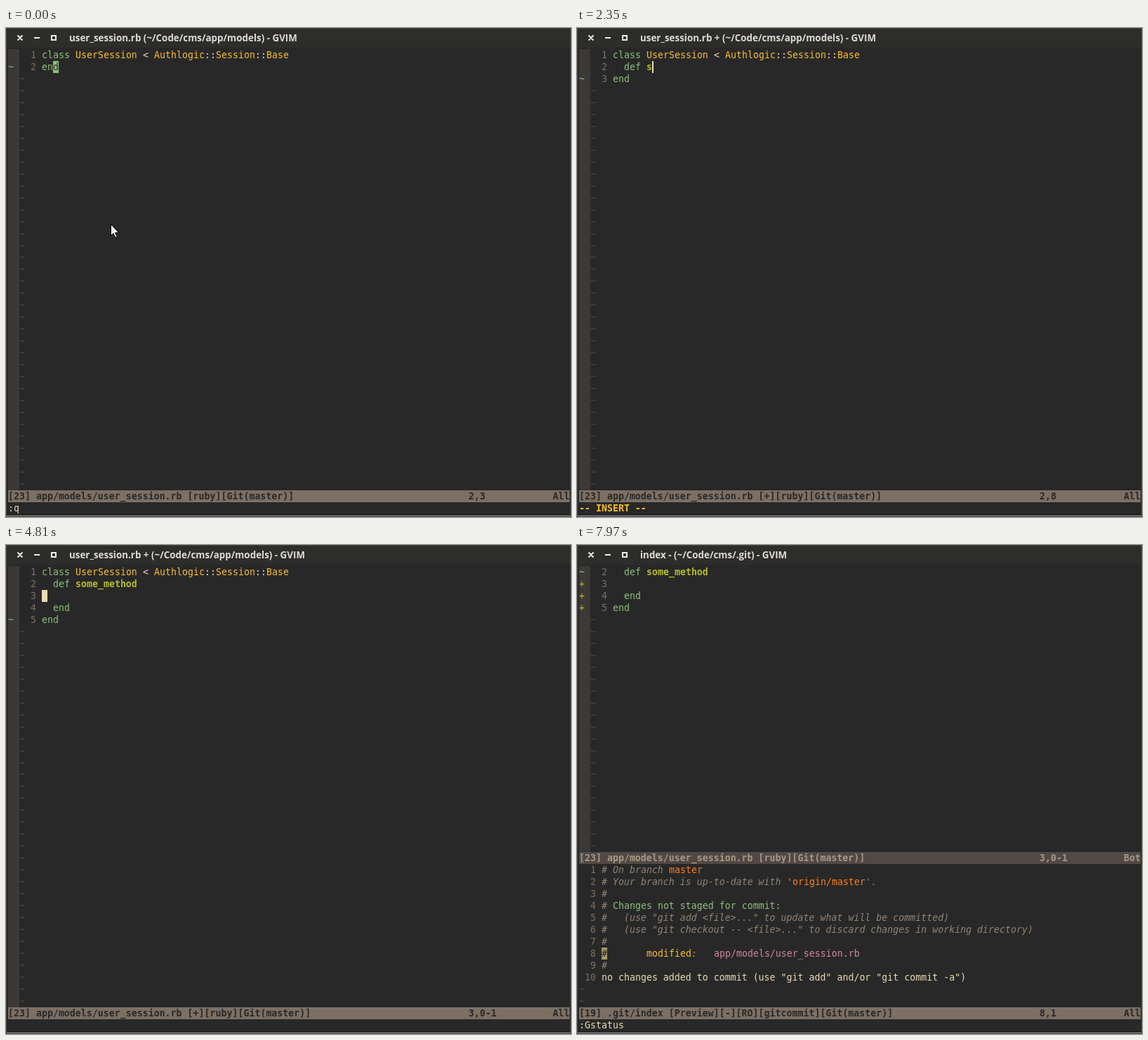
Recreate the animation shown at these times as an HTML page with a canvas. Size 805 px wide and 696 px high, loop 8 s.

```html
<!DOCTYPE html>
<html lang="en">
<head>
<meta charset="utf-8">
<title>Editor session</title>
<style>
html, body { margin: 0; width: 100%; height: 100%; overflow: hidden; background: #282828; }
canvas { display: block; }
</style>
</head>
<body>
<canvas id="stage" width="805" height="696"></canvas>
<script>
const ctx = document.getElementById('stage').getContext('2d');
const LOOP = 8000, W = 8, H = 16.97, LEFT = 3, TOP = 30;
const MONO = '13.288px "DejaVu Sans Mono", monospace';
const C = {
  bg: '#282828', fg: '#ebdbb2', green: '#8ec07c', lime: '#b8bb26', yellow: '#fabd2f',
  orange: '#fe8019', pink: '#d3869b', grey: '#928374', num: '#7c6f64', faint: '#504945',
  sign: '#3c3836', bar: '#7c6f64', menu: '#504945', dimText: '#a89984', hash: '#a39c6c'
};
const BUFFER_WORDS = ('DESC delete digest default destroy details defined defaults directory deleteable? ' +
  'definitions define_method deliver_enquiry deliver_confirmation').split(' ');
const SYNTAX_WORDS = ('def DEBUG defout deferr debugger defined? delegate DESCRIPTION delegating_accessor').split(' ');
const WORDS = [...BUFFER_WORDS.map(w => [w, 'B']), ...SYNTAX_WORDS.map(w => [w, 'S'])];
const DEF_WORDS = WORDS.filter(([w]) => w.startsWith('def'));
const SOME = [['some', 'B']];
const FILE = 'app/models/user_session.rb';

// Insert mode: typed text, ruler position, completion menu
const type = (typed, pos, menu = null) => ({ typed, col: typed.length + 2, pos, menu });
const cmdline = cmd => ({ cmd, row: 38, col: cmd.length, cursor: 'block', ink: C.fg, under: '' });
const gitRow = n => ({ row: 24 + n, pos: n + ',1' });

// Each entry changes part of the state from its time on
const EVENTS = [
  [0, { typed: null, body: false, split: false, index: false, mod: false, signs: ' ~', row: 1, col: 2,
        cursor: 'block', ink: C.green, under: 'd', pos: '2,3', cmd: ':q', keys: '', menu: null, mouse: true }],
  [520, { cursor: '' }],
  [770, { cursor: 'block' }],
  [1080, { row: 0, under: 'a', mouse: false }],
  [1120, { pos: '1,3' }],
  [1600, { ...type('', '2,3'), row: 1, cursor: 'bar', mod: true, cmd: '-- INSERT --', signs: '  ~' }],
  [1920, type('d', '2,4')],
  [1960, type('de', '2,5-4')],
  [2000, type('de', '2,5', WORDS)],
  [2040, type('def', '2,6-5', DEF_WORDS)],
  [2200, type('def ', '2,7')],
  [2350, type('def s', '2,8')],
  [2440, type('def so', '2,9', SOME)],
  [2540, type('def som', '2,10-9', SOME)],
  [2660, type('def some', '2,11-10', SOME)],
  [2990, type('def some_', '2,12')],
  [3150, type('def some_m', '2,13')],
  [3190, type('def some_me', '2,13')],
  [3230, { pos: '2,14' }],
  [3380, type('def some_met', '2,15')],
  [3440, type('def some_meth', '2,16')],
  [3500, type('def some_metho', '2,17')],
  [3570, type('def some_method', '2,17')],
  [3630, { pos: '2,18' }],
  [4130, { body: true, row: 2, col: 4, pos: '3,5', signs: '    ~' }],
  [4810, { col: 0, cursor: 'block', ink: C.fg, under: '', pos: '3,0-1', cmd: '' }],
  [5070, cmdline(':')],
  [5220, cmdline(':w')],
  [5370, { cmd: `"${FILE}" 5L, 74C written`, row: 2, col: 0 }],
  [5410, { mod: false }],
  [5450, { signs: ' ~+++' }],
  [6040, { keys: '<20>' }],
  [6140, { keys: '<20>g' }],
  [6250, { ...cmdline(':Gstatus'), keys: '' }],
  [6390, { split: true, signs: '~+++', ...gitRow(1), col: 0, ink: C.hash, under: '#' }],
  [6430, { index: true }],
  [6920, gitRow(2)],
  [7090, gitRow(3)],
  [7250, gitRow(4)],
  [7430, gitRow(5)],
  [7930, gitRow(7)],
  [7970, gitRow(8)]
];

const x = col => LEFT + col * W;
const y = row => Math.round(TOP + row * H);

function box(col, row, cols, rows, color) {
  ctx.fillStyle = color;
  ctx.fillRect(x(col), y(row), cols * W, y(row + rows) - y(row));
}

function text(col, row, str, color = C.fg, style = '') {
  ctx.font = style + ' ' + MONO;
  ctx.fillStyle = color;
  ctx.fillText(str, x(col), y(row) + 13);
}

// Consecutive pieces: [string, color, style]
function line(col, row, ...parts) {
  for (const [str, color, style] of parts) {
    text(col, row, str, color, style);
    col += str.length;
  }
}

function statusBar(row, name, pos, right, active) {
  box(0, row, 100, 1, active ? C.bar : C.menu);
  const color = active ? C.bg : C.dimText;
  text(0, row, name, color, 'bold');
  text(82, row, pos, color, 'bold');
  text(97, row, right, color, 'bold');
}

function titleBar(title) {
  ctx.fillStyle = '#2d2d2b';
  ctx.fillRect(0, 0, 805, 28);
  ctx.font = 'bold 13.4px "Open Sans", sans-serif';
  ctx.fillStyle = '#dfdbd2';
  ctx.fillText(title, 90, 19);
  ctx.strokeStyle = '#eeeeec';
  ctx.lineWidth = 2;
  ctx.beginPath();
  ctx.moveTo(16.5, 10.5); ctx.lineTo(23.5, 17.5);
  ctx.moveTo(23.5, 10.5); ctx.lineTo(16.5, 17.5);
  ctx.moveTo(40, 14); ctx.lineTo(48, 14);
  ctx.rect(65, 11, 6, 6);
  ctx.stroke();
}

function frame() {
  ctx.fillStyle = '#464543';
  ctx.fillRect(0, 0, 805, 1);
  ctx.fillRect(0, 0, 1, 696);
  ctx.fillRect(804, 0, 1, 696);
  ctx.fillStyle = '#a9a8a4';
  ctx.fillRect(1, 694, 803, 1);
}

function codeLines(s) {
  const end = ['end', C.green];
  const lines = [[['class ', C.green], ['UserSession', C.yellow], [' < '], ['Authlogic', C.yellow], ['::'],
    ['Session', C.yellow], ['::'], ['Base', C.yellow]]];
  if (s.typed !== null) {
    const isDef = s.typed.startsWith('def');
    lines.push([['  '], [s.typed.slice(0, 3), isDef ? C.green : C.fg], [s.typed.slice(3), C.lime, 'bold']]);
  }
  if (s.body) lines.push([], [['  '], end]);
  lines.push([end]);
  return lines;
}

function codeWindow(s) {
  const rows = s.split ? 24 : 37, first = s.split ? 1 : 0;
  const lines = codeLines(s);
  box(0, 0, 2, rows, C.sign);
  for (let r = 0; r < rows; r++) {
    const sign = s.signs[r] || '', parts = lines[r + first];
    text(0, r, sign, sign === '+' ? C.lime : C.green);
    if (parts) {
      text(4, r, String(r + first + 1), C.num);
      line(6, r, ...parts);
    } else text(2, r, '~', C.faint);
  }
  const name = `[23] ${FILE} ${s.mod ? '[+]' : ''}[ruby][Git(master)]`;
  statusBar(rows, name, s.split ? '3,0-1' : s.pos, s.split ? 'Bot' : 'All', !s.split);
}

function gitWindow(s) {
  const note = str => [str, C.grey, 'italic'];
  const lines = [
    [note('# On branch '), ['master', C.orange]],
    [note('# Your branch is up-to-date with '), ["'", C.orange, 'italic'], ['origin/master', C.orange], note("'.")],
    [note('#')],
    [note('# '), ['Changes not staged for commit:', C.green]],
    [note('#   (use "git add <file>..." to update what will be committed)')],
    [note('#   (use "git checkout -- <file>..." to discard changes in working directory)')],
    [note('#')],
    [note('#       '), ['modified', C.yellow], note(':   '), [FILE, C.pink]],
    [note('#')],
    [['no changes added to commit (use "git add" and/or "git commit -a")']]
  ];
  lines.forEach((parts, i) => {
    text(0, 25 + i, String(i + 1).padStart(3), C.num);
    line(4, 25 + i, ...parts);
  });
  text(0, 35, '~', C.faint);
  text(0, 36, '~', C.faint);
  statusBar(37, '[19] .git/index [Preview][-][RO][gitcommit][Git(master)]', s.pos, 'All', true);
}

function menu(items, col) {
  const longest = Math.max(...items.map(([w]) => w.length));
  box(col, 2, Math.max(16, longest + 6), items.length, C.menu);
  items.forEach(([w, kind], i) => text(col + 1, 2 + i, `${w.padEnd(longest + 1)}[${kind}]`));
}

function cursor(s) {
  const col = s.row === 38 ? s.col : s.col + (s.split ? 4 : 6);
  if (s.cursor === 'block') {
    box(col, s.row, 1, 1, s.ink);
    text(col, s.row, s.under, C.bg);
  } else if (s.cursor === 'bar') {
    ctx.fillStyle = C.fg;
    ctx.fillRect(x(col), y(s.row), 2, 17);
  }
}

function pointer() {
  const p = new Path2D('M149.5 279.5V295.5L153 292.2L155.7 298.3L158.3 297.2L155.6 291.2H160.5Z');
  ctx.fillStyle = '#fff';
  ctx.fill(p);
  ctx.strokeStyle = '#000';
  ctx.lineWidth = 1;
  ctx.stroke(p);
}

function draw(t) {
  const s = {};
  for (const [at, change] of EVENTS) if (at <= t) Object.assign(s, change);
  ctx.fillStyle = C.bg;
  ctx.fillRect(0, 0, 805, 696);
  titleBar(s.index ? 'index - (~/Code/cms/.git) - GVIM'
    : `user_session.rb ${s.mod ? '+ ' : ''}(~/Code/cms/app/models) - GVIM`);
  codeWindow(s);
  if (s.split) gitWindow(s);
  const insert = s.cmd.startsWith('--');
  text(0, 38, s.cmd, insert ? C.yellow : C.fg, insert ? 'bold' : '');
  text(89, 38, s.keys);
  if (s.menu) menu(s.menu, s.typed.length > 3 ? 11 : 7);
  cursor(s);
  if (s.mouse) pointer();
  frame();
}

const start = performance.now();
function tick() {
  draw((performance.now() - start) % LOOP);
  requestAnimationFrame(tick);
}
tick();
</script>
</body>
</html>
```
